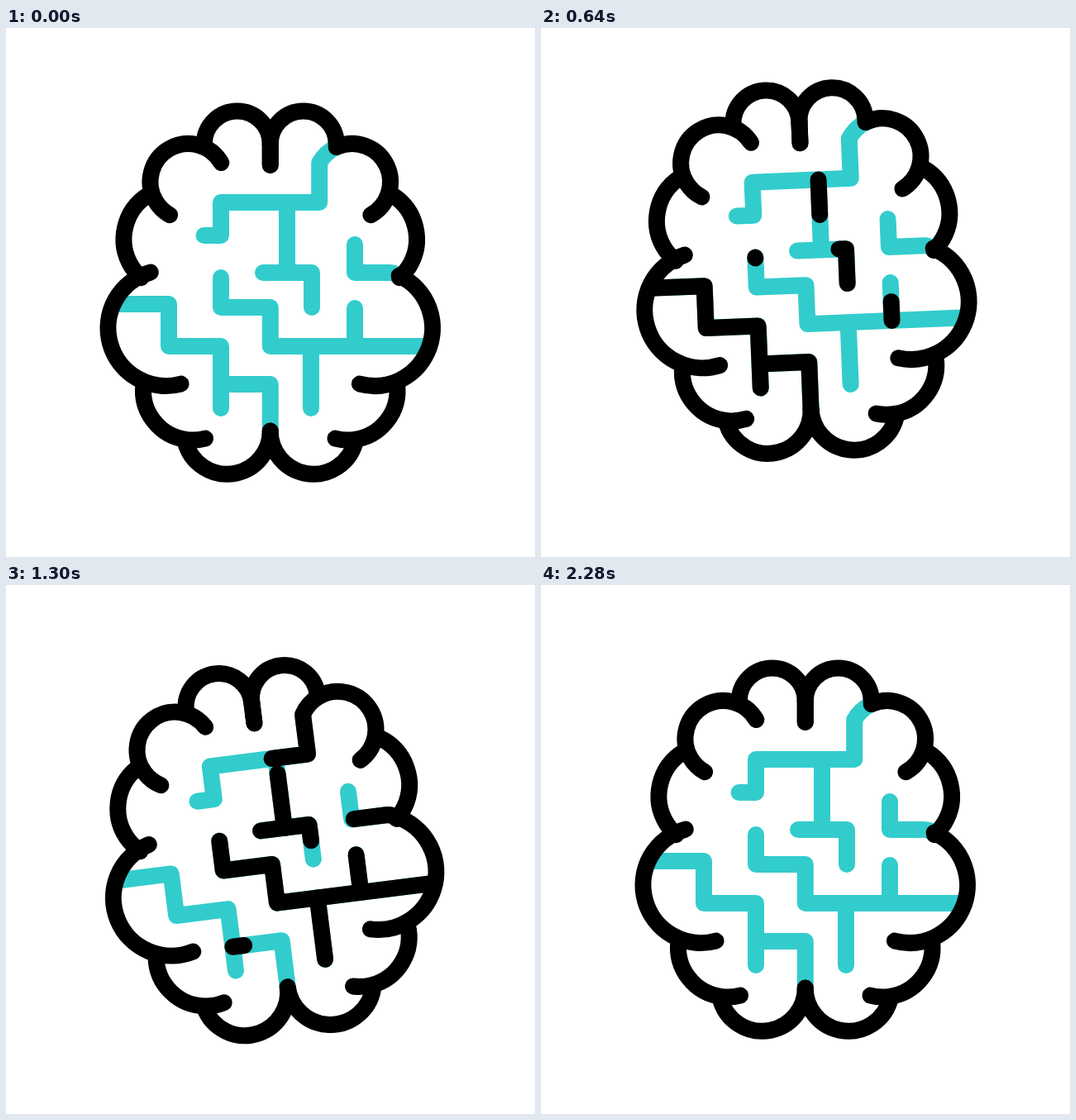
These frames come from a looping animation (640x640 px, 2400 ms). An HTML page with a canvas:

```html
<!DOCTYPE html>
<html lang="en">
<head>
<meta charset="utf-8">
<title>Brain circuit</title>
<style>
  html, body { margin: 0; width: 100%; height: 100%; overflow: hidden; background: #fff; }
  canvas { display: block; width: 640px; height: 640px; }
</style>
</head>
<body>
<canvas id="stage" width="640" height="640"></canvas>
<script>
const ctx = document.getElementById('stage').getContext('2d');
const LOOP = 2400, STEP = 20, AXIS = 319.75, CENTER = 320;
const BLACK = '#000', TEAL = '#33cccc';
const rad = deg => deg * Math.PI / 180;

// Turning points at a regular beat
const everyBeat = (beat, values) => values.map((value, i) => [i * beat, value]);
const bounce = everyBeat(356, [0, 54.5, -36.5, 54.5, -21, 14.5, 0]);
const sway = [...everyBeat(435, [0, -16.4, 14.4, -7.2, 4.35]), [2020, 0]];

// A trace is drawn along its path, then erased in the same direction; long ones take longer.
function trace(d, grow, erase = grow + 730) {
  const measure = document.createElementNS('http://www.w3.org/2000/svg', 'path');
  measure.setAttribute('d', d);
  const length = measure.getTotalLength();
  return { path: new Path2D(d), length, grow, erase, duration: length > 110 ? 465 : 360 };
}

const traces = [
  trace('M260 460V385H197V334H130', 0, 755),
  trace('M319.75 488V431H260', 205),
  trace('M340 211V296', 460),
  trace('M370 338V296H311', 460),
  trace('M422 385V339', 460),
  trace('M260 302V338H319.75V385H512', 627),
  trace('M369 385V460', 855),
  trace('M475 300Q470 296 464 296H422V262', 1100, 1580),
  trace('M400 144A46 46 0 0 0 379.2 163V211H260V251H239.5', 1077, 1807)
];

function ease(x) {
  const s = Math.min(1, Math.max(0, x));
  return s * s * (3 - 2 * s);
}

function valueAt(keys, t) {
  const i = keys.findIndex(([time]) => time > t);
  if (i < 0) return keys[keys.length - 1][1];
  const [t0, v0] = keys[i - 1], [t1, v1] = keys[i];
  return v0 + (v1 - v0) * ease((t - t0) / (t1 - t0));
}

function strokeTrace({ path, length }, color, from, to) {
  if (to - from < 0.002) return;
  ctx.strokeStyle = color;
  ctx.setLineDash([(to - from) * length + 0.1, length * 3]);
  ctx.lineDashOffset = -from * length;
  ctx.stroke(path);
}

function lobe(x, y, r, from, to) {
  ctx.beginPath();
  ctx.arc(x, y, r, rad(from), rad(to), true);
  ctx.stroke();
}

function halfOutline(upperStart, sideStart) {
  ctx.stroke(new Path2D(`M${AXIS} 166V140.5`));
  lobe(279.75, 140.5, 40, 0, 175);
  lobe(220.5, 186, 46, upperStart, 119);
  lobe(205.5, 255.5, 63, 238, 132);
  lobe(193.5, 363, 70, sideStart, 75);
  lobe(226, 438.5, 60, 187, 75.5);
  lobe(267.5, 487.5, 52.25, 168, 0);
}

function draw(t) {
  ctx.fillStyle = '#fff';
  ctx.fillRect(0, 0, 640, 640);
  ctx.save();
  ctx.translate(CENTER, CENTER + valueAt(bounce, t));
  ctx.rotate(rad(valueAt(sway, t)));
  ctx.translate(-CENTER, -CENTER);
  ctx.lineWidth = 20;
  ctx.lineCap = ctx.lineJoin = 'round';

  traces.forEach(tr => strokeTrace(tr, TEAL, 0, 1));
  traces.forEach(tr => strokeTrace(tr, BLACK,
    ease((t - tr.erase) / tr.duration), ease((t - tr.grow) / tr.duration)));

  ctx.setLineDash([]);
  ctx.strokeStyle = BLACK;
  halfOutline(-30, 254.5);
  ctx.translate(2 * AXIS, 0);
  ctx.scale(-1, 1);
  halfOutline(-66, 245);
  ctx.restore();
}

const start = performance.now();
function tick() {
  const t = (performance.now() - start) % LOOP;
  draw(Math.floor(t / STEP) * STEP);
  requestAnimationFrame(tick);
}
tick();
</script>
</body>
</html>
```
